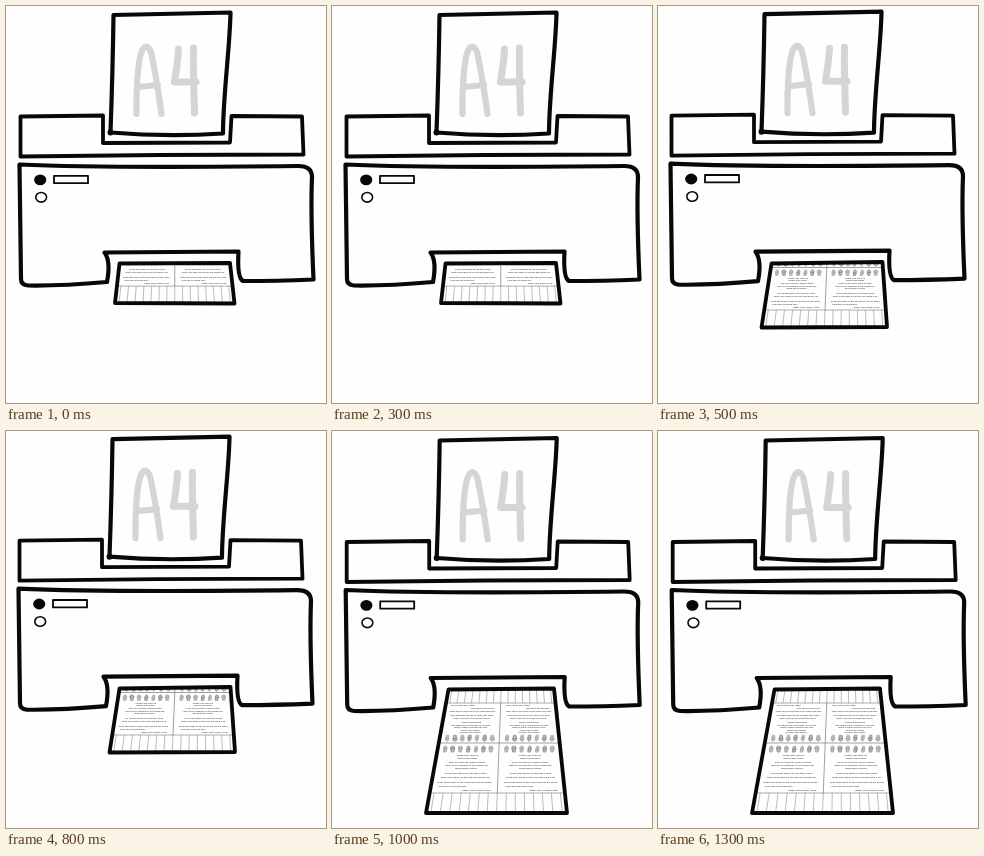
Recreate the animation shown at these times as an HTML page with a canvas. Size 320x397 px, loop 1500 ms.

```html
<!DOCTYPE html>
<html lang="en">
<head>
<meta charset="utf-8">
<title>Printer</title>
<style>
  html, body { margin: 0; width: 100%; height: 100%; overflow: hidden; background: #fefefe; }
  canvas { display: block; }
</style>
</head>
<body>
<canvas width="320" height="397"></canvas>
<script>
const ctx = document.querySelector('canvas').getContext('2d');
const STEP = 500;
const HALF = 70; // height and half width of the lower half of the sheet
const FRINGE = 20;

// Shake of the printer, corners of the visible sheet (clockwise), height scale of its print
const poses = [
  { dx: 0, dy: 0, corners: [[113.5, 257.5], [224, 257], [228.5, 297.5], [109, 297]], scale: .87 },
  { dx: -1, dy: -.8, corners: [[113.5, 257.5], [224.5, 256], [229, 321], [103.5, 321.5]], scale: .85 },
  { dx: .2, dy: .5, corners: [[116.5, 258.5], [222, 257.5], [235, 382], [94, 382]], scale: 1 }
];

// Height above the sheet's lower edge, horizontal shift, text
const rows = [
  [23, 13, 'KEEP THIS STRIP SAFE'],
  [26.5, -12, 'Fold and cut along here'],
  [30.5, 0, 'Print both sides of the sheet and cut the strips'],
  [36, 0, 'Write your name on the line and hang it up'],
  [39.5, 0, 'on the wall where all can take a strip'],
  [45, 0, 'Bring warm clothes'],
  [48, 0, 'Meet us on Saturday at the village hall'],
  [51, 0, 'Free for everyone, bring a friend'],
  [54.5, 0, 'Games and songs'],
  [57.5, 0, 'COME AND JOIN US']
];

function line(path, width, color = '#080808', fill) {
  const shape = new Path2D(path);
  if (fill) { ctx.fillStyle = fill; ctx.fill(shape); }
  ctx.lineWidth = width;
  ctx.strokeStyle = color;
  ctx.stroke(shape);
}

function oval(x, y, rx, ry, fill) {
  ctx.beginPath();
  ctx.ellipse(x, y, rx, ry, 0, 0, 7);
  ctx.fillStyle = fill;
  ctx.fill();
  ctx.lineWidth = 1.6;
  ctx.strokeStyle = '#080808';
  ctx.stroke();
}

function drawPrinter() {
  line('M104.5 126.5C106 85 107 45 107.5 9Q165 8 224.5 6.5C224 40 217 90 217 127.5Q160 131 104.5 126.5', 4.2);
  oval(104.5, 126.5, 2.2, 2.2, '#080808');
  line('M130.5 108C130 82 132 55 135.5 46Q140 35 145 46C149 64 153 90 155.5 108M132 81L152 79', 6.2, '#d5d5d5');
  line('M172.5 43C172 55 170 66 168.5 76L190 76M187.5 42C187 60 188 89 188.5 107', 7, '#d5d5d5');
  line('M14.5 110.5L97 109.5L97 137L224 136.5L225.5 110L296 110.5L297.5 148.5Q150 148.5 14.5 150.5Z', 3.8);
  line('M13.5 158.5C90 162 200 161 292 160Q306 160 306 171C304.5 205 306 240 307.5 273.5' +
    'Q270 275 237 275Q231 272 232.5 245.5L98.5 246.5Q105 255 101 276Q55 280 22 279.5Q15 279 15 273Z', 4.2);
  oval(34.2, 173.8, 5.3, 4.6, '#080808');
  oval(35.2, 191.3, 5.4, 4.8, '#fefefe');
  line('M48 169.8H82V177.2H48Z', 1.8);
}

function drawSheet({ corners: [tl, tr, br, bl], scale }) {
  const outline = 'M' + [tl, tr, br, bl].join('L') + 'Z';
  const bottom = br[1];
  // Sheet position (u from -1 to 1, height v) to the stage
  const place = (u, v) => {
    const y = bottom - scale * (Math.min(v, HALF) + .8 * Math.max(0, v - HALF));
    const f = (y - tl[1]) / (bottom - tl[1]);
    const left = tl[0] + (bl[0] - tl[0]) * f;
    const right = tr[0] + (br[0] - tr[0]) * f;
    return { x: (left + right) / 2 + u * (right - left) / 2, y, size: (right - left) / 2 / HALF };
  };
  const rule = (u1, v1, u2, v2, color) => {
    const a = place(u1, v1), b = place(u2, v2);
    line(`M${a.x} ${a.y}L${b.x} ${b.y}`, .8, color);
  };

  ctx.save();
  ctx.fillStyle = '#fefefe';
  ctx.fill(new Path2D(outline));
  ctx.clip(new Path2D(outline));
  ctx.textAlign = 'center';
  ctx.textBaseline = 'middle';

  for (const upper of [false, true]) {
    const flip = v => upper ? 2 * HALF - v : v;
    const stamp = (u, v, paint) => {
      const p = place(u, flip(v));
      ctx.save();
      ctx.translate(p.x, p.y);
      if (upper) ctx.rotate(Math.PI);
      ctx.scale(p.size, p.size);
      paint();
      ctx.restore();
    };
    rule(-1, flip(FRINGE), 1, flip(FRINGE), '#999');
    for (let i = -7; i <= 7; i++) rule(i / 7.5, flip(0), i / 7.5, flip(FRINGE), '#aaa');
    for (const side of [-.5, .5]) {
      for (const [v, shift, text] of rows) stamp(side, v, () => {
        ctx.font = 'bold 2.6px "Liberation Sans", sans-serif';
        ctx.fillStyle = '#555';
        ctx.fillText(text, shift, 0);
      });
      for (let i = 0; i < 7; i++) stamp(side + (i - 3) * .125, 64, () => {
        const lean = Math.sin(i * 5);
        line(`M-2 3L${-2 + lean} -2Q0 -5 2 -2L1 3Z M-2 0L2 ${lean}`, 1, i % 2 ? '#888' : '#aaa', '#bbb');
      });
    }
  }
  rule(0, FRINGE, 0, 2 * HALF - FRINGE, '#888');
  rule(-1, HALF, 1, HALF, '#888');
  ctx.restore();
  line(outline, 3.8);
}

function draw() {
  const pose = poses[Math.floor(performance.now() / STEP) % poses.length];
  ctx.fillStyle = '#fefefe';
  ctx.fillRect(0, 0, 320, 397);
  ctx.lineCap = ctx.lineJoin = 'round';
  ctx.save();
  ctx.translate(pose.dx, pose.dy);
  drawPrinter();
  ctx.restore();
  drawSheet(pose);
  requestAnimationFrame(draw);
}
draw();
</script>
</body>
</html>
```
